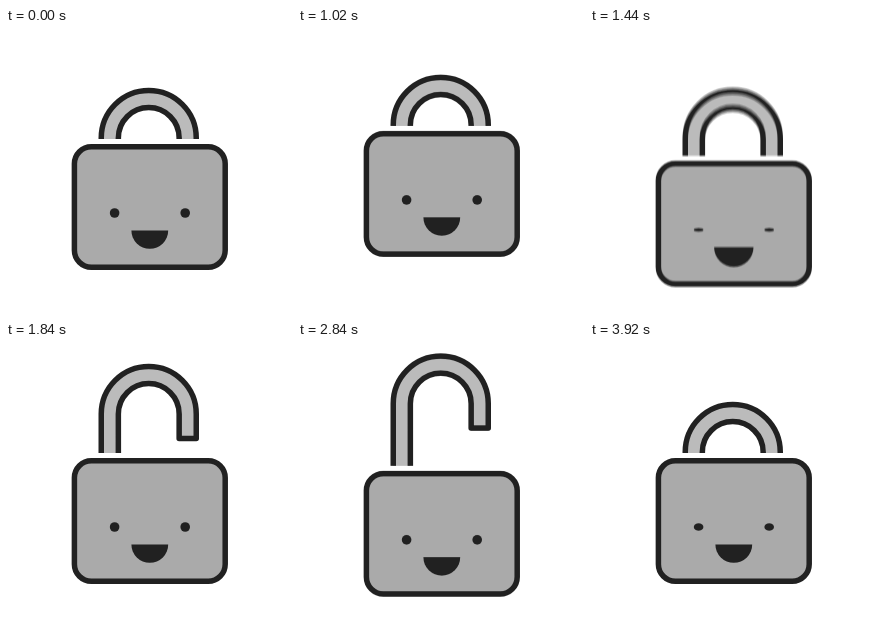
These frames come from a looping animation (286 px wide and 286 px high, 3.94 s). An HTML page with a canvas:

```html
<!DOCTYPE html>
<html lang="en">
<head>
<meta charset="utf-8">
<title>Happy padlock</title>
<style>
  html, body { margin: 0; width: 100%; height: 100%; overflow: hidden; background: #fff; }
  canvas { display: block; width: 100vw; height: 100vh; }
</style>
</head>
<body>
<canvas></canvas>
<script>
const SIZE = 286, LOOP = 3940, SHUTTER = 8, SAMPLES = 6;
const INK = '#212121', BODY = '#aaa', METAL = '#bbb';
const canvas = document.querySelector('canvas');
const screen2d = canvas.getContext('2d');
const layer = document.createElement('canvas');
const ctx = layer.getContext('2d');

const clamp = t => Math.min(1, Math.max(0, t));
const sine = t => (1 - Math.cos(Math.PI * t)) / 2;
const cubic = t => t < .5 ? 4 * t ** 3 : 1 - 4 * (1 - t) ** 3;
const ramp = (t, from, to, ease = sine) => ease(clamp((t - from) / (to - from)));
const bump = (t, middle, reach) => sine(clamp(1 - Math.abs(t - middle) / reach));

// Crouch and spring open, then crouch again and snap shut.
const bodyY = t =>
  -14 * ramp(t, 0, 960) + 51 * ramp(t, 960, 1330, cubic) - 37 * ramp(t, 1330, 1540)
  + 16 * ramp(t, 2485, 2990) - 18.5 * ramp(t, 2990, 3180) + 2.5 * ramp(t, 3180, 3500);

// Height of the shackle above its closed place in the body.
const lift = t =>
  51 * ramp(t, 1340, 1605) - 13 * ramp(t, 1605, 1840)
  + 29 * ramp(t, 2485, 2990) - 69 * ramp(t, 2990, 3180) + 2 * ramp(t, 3180, 3500);

const eyeOpen = t => 1 - .65 * (bump(t, 1440, 110) + bump(t, 3167, 110) + bump(t, 3855, 110));
const mouthSize = t => 1 + .07 * bump(t, 1440, 250);

function outline(fill) {
  ctx.fillStyle = fill;
  ctx.strokeStyle = INK;
  ctx.lineWidth = 5.5;
  ctx.lineJoin = 'round';
  ctx.fill();
  ctx.stroke();
}

function drawShackle(height) {
  const cx = 142.75, cy = 110 - height, outer = 47.5, inner = 30.4;
  ctx.save();
  ctx.beginPath();
  ctx.rect(0, -SIZE, SIZE, SIZE + 111);
  ctx.clip();
  ctx.beginPath();
  ctx.moveTo(cx - outer, SIZE);
  ctx.arc(cx, cy, outer, Math.PI, 0);
  ctx.lineTo(cx + outer, cy + 24.5);
  ctx.lineTo(cx + inner, cy + 24.5);
  ctx.arc(cx, cy, inner, 0, Math.PI, true);
  ctx.lineTo(cx - inner, SIZE);
  outline(METAL);
  ctx.restore();
}

function drawBody(eyes, mouth) {
  ctx.beginPath();
  ctx.roundRect(68.4, 118.8, 150.8, 120.4, 17);
  outline(BODY);
  ctx.fillStyle = INK;
  for (const x of [108.6, 179.2]) {
    ctx.beginPath();
    ctx.ellipse(x, 185, 4.8, 4.8 * eyes, 0, 0, 2 * Math.PI);
    ctx.fill();
  }
  ctx.beginPath();
  ctx.arc(143.8, 202.4, 18.4 * mouth, 0, Math.PI);
  ctx.fill();
}

function drawLock(t) {
  ctx.setTransform(layer.width / SIZE, 0, 0, layer.height / SIZE, 0, 0);
  ctx.fillStyle = '#fff';
  ctx.fillRect(0, 0, SIZE, SIZE);
  ctx.translate(0, bodyY(t));
  drawShackle(lift(t));
  drawBody(eyeOpen(t), mouthSize(t));
}

function fit() {
  const ratio = devicePixelRatio || 1;
  const w = Math.round(innerWidth * ratio), h = Math.round(innerHeight * ratio);
  if (canvas.width === w && canvas.height === h) return;
  canvas.width = layer.width = w;
  canvas.height = layer.height = h;
}

// Average several moments within the shutter time for motion blur.
function draw(t) {
  fit();
  for (let i = 0; i < SAMPLES; i++) {
    drawLock(t + SHUTTER * (i / (SAMPLES - 1) - .5));
    screen2d.globalAlpha = 1 / (i + 1);
    screen2d.drawImage(layer, 0, 0);
  }
}

const start = performance.now();
function frame() {
  draw((performance.now() - start) % LOOP);
  requestAnimationFrame(frame);
}
frame();
</script>
</body>
</html>
```
